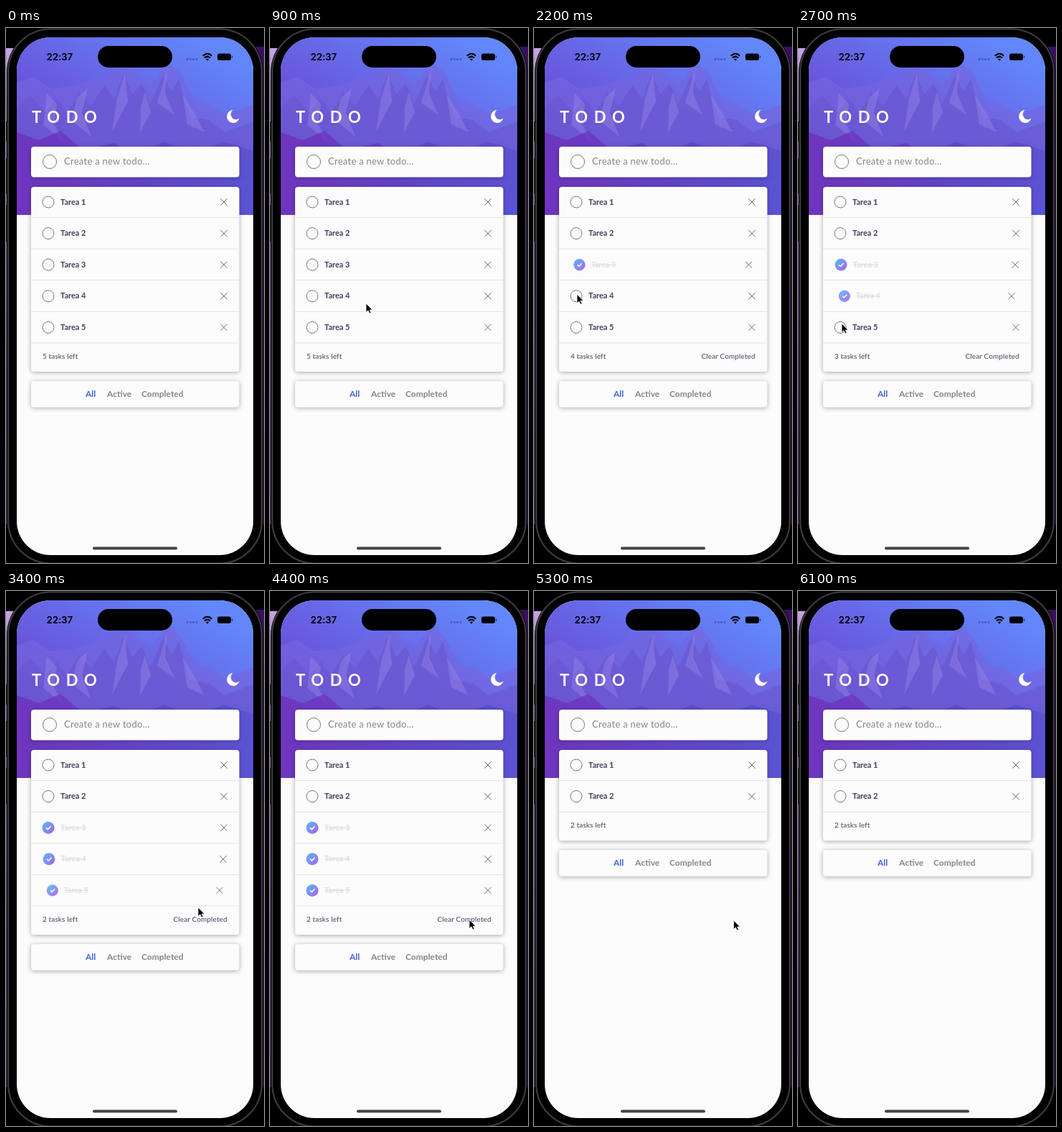
Write an HTML page that moves like this. It is 360 by 744 pixels and loops after 7.2 s.

```html
<!DOCTYPE html>
<html lang="es">
<head>
<meta charset="utf-8">
<title>Todo</title>
<style>
  html, body { margin: 0; width: 100%; height: 100%; overflow: hidden; background: #000; }
  svg { display: block; width: 360px; height: 744px; }
  text { font-family: Lato, sans-serif; }
  .card { fill: #fcfcfc; filter: drop-shadow(0 1px 3px rgba(30, 30, 60, .4)); }
  .line { stroke: #dfdfea; }
  .ring { fill: none; stroke: #77777d; }
  .cross { stroke: #66666c; fill: none; }
  .task { font-size: 11px; font-weight: 700; fill: #443f5c; }
  .done .task { fill: #dedee3; text-decoration: line-through; }
  .small { font-size: 10px; letter-spacing: .12px; fill: #45415a; }
  .filter { font-size: 12px; font-weight: 700; fill: #85858f; }
  .check, .done .ring { display: none; }
  .done .check { display: inline; }
</style>
</head>
<body>
<svg viewBox="0 0 360 744">
  <defs>
    <clipPath id="screen"><rect x="15" y="13" width="330" height="720" rx="47"/></clipPath>
    <linearGradient id="sky" x1="0" y1="1" x2=".75" y2="0">
      <stop offset="0" stop-color="#7029b7"/>
      <stop offset=".45" stop-color="#6a51d9"/>
      <stop offset="1" stop-color="#6287fa"/>
    </linearGradient>
    <linearGradient id="shade" x1="0" y1="0" x2="1" y2="0">
      <stop offset="0" stop-color="#7029b8"/>
      <stop offset="1" stop-color="#5550d2"/>
    </linearGradient>
    <linearGradient id="checkFill" x1="0" y1="0" x2="1" y2="1">
      <stop offset="0" stop-color="#55bcfb"/>
      <stop offset="1" stop-color="#aa60f1"/>
    </linearGradient>
    <linearGradient id="leftEdge" x1="0" y1="0" x2="0" y2="1">
      <stop offset="0" stop-color="#c8a2e6"/>
      <stop offset=".2" stop-color="#8a55b5"/>
      <stop offset="1" stop-color="#51306f"/>
    </linearGradient>
  </defs>

  <!-- phone body -->
  <rect width="360" height="744"/>
  <rect y="28" width="30" height="662" fill="url(#leftEdge)"/>
  <rect x="330" y="26" width="30" height="664" fill="#38105f"/>
  <rect x="1" y="0" width="358" height="746" rx="61" fill="#080808"/>
  <rect x="3.2" y="1.5" width="353.6" height="743" rx="59" fill="#000" stroke="#3d3d3f" stroke-width="2"/>
  <path d="M.5 130v28M.5 181v50M.5 246v51" stroke="#19191b" stroke-width="2"/>

  <g clip-path="url(#screen)">
    <rect x="15" y="13" width="330" height="720" fill="#fcfcfc"/>
    <rect x="15" y="13" width="330" height="247" fill="url(#sky)"/>
    <path d="M15 76L38 68 62 84 94 81 121 72 146 62 166 55 184 65 202 80 218 56 232 51 246 67 263 101 286 107 306 121 345 106V260H15Z" fill="#7666df" opacity=".65"/>
    <path d="M15 112L34 94 54 117 72 98 85 119 102 90 119 108 137 80 151 98 164 64 176 92 190 77 201 106 219 66 231 88 241 71 257 124 283 128 304 145 345 130V260H15Z" fill="#6654cd" opacity=".55"/>
    <path d="M57 91l14 15-4 28 15 25-30-24zM114 84l-8 34 13 33-27-22 7-32zM166 62l4 40-22 42 7-46zM225 57l-3 35 13 29-24-17zM246 91l20 33 11 21-24-11zM194 89l8 28-15 29 1-36z" fill="#9b87e7" opacity=".4"/>
    <path d="M15 145L46 156 76 143 108 170 150 160 183 175 221 158 263 176 303 158 345 171V260H15Z" fill="url(#shade)" opacity=".72"/>

    <!-- status bar -->
    <rect x="128" y="25" width="104" height="30" rx="15"/>
    <text x="56.5" y="45" style="font:600 13.5px Inter,sans-serif;letter-spacing:-.2px">22:37</text>
    <path d="M253 43.5h15" stroke="#2b3585" stroke-width="2.6" stroke-linecap="round" stroke-dasharray="0 4.3" opacity=".7"/>
    <g fill="none" stroke="#000" stroke-width="2">
      <path d="M274.7 38.7Q281 32.8 287.3 38.7M277 41.4Q281 37.8 285 41.4"/>
    </g>
    <path d="M278.9 43.4Q281 41.6 283.1 43.4L281 45.7Z"/>
    <rect x="295" y="35.5" width="19" height="9.5" rx="3"/>
    <path d="M315.6 38.5v3.5" stroke="#29306f" stroke-width="1.3"/>

    <text x="36" y="131.5" fill="#fff" style="font-size:22px;font-weight:700;letter-spacing:8.6px">TODO</text>
    <path d="M316.5 114A9 9 0 1 0 325.7 125.6A7.2 7.2 0 0 1 316.5 114Z" fill="#fff"/>

    <rect class="card" x="35" y="165" width="290.5" height="42.5" rx="4"/>
    <circle class="ring" cx="61" cy="186" r="9.5"/>
    <text x="81" y="189.8" fill="#85858d" style="font-size:13px;letter-spacing:.28px">Create a new todo...</text>

    <rect id="list" class="card" x="35" y="221" width="290.5" height="257" rx="4"/>
    <g id="lines"></g>
    <g id="rows"></g>
    <g id="lower">
      <text id="count" class="small" x="51" y="460"></text>
      <text id="clear" class="small" x="233.5" y="460">Clear Completed</text>
      <rect class="card" x="35" y="491" width="290.5" height="36.5" rx="4"/>
      <text class="filter" x="111" y="513" style="fill:#3d61dc">All</text>
      <text class="filter" x="141" y="513">Active</text>
      <text class="filter" x="189" y="513">Completed</text>
    </g>
    <rect x="121" y="721.5" width="118" height="4" rx="2" fill="#444446"/>
  </g>
  <path id="cursor" d="M0 0V12.4L2.9 9.8 5 14 7.1 13 5.1 9H9Z" stroke="#fff" stroke-width=".8"/>
</svg>
<script>
  const LOOP = 7200, STEP = 100, ROW = 43.6;
  const CLEAR = 4800, COLLAPSE = 5200, CURSOR_OUT = 6000;
  const checkedAt = [Infinity, Infinity, 1600, 2300, 3000];
  const $ = id => document.getElementById(id);

  // Linear interpolation through [time, value...] stops.
  function track(stops, t) {
    if (t <= stops[0][0]) return stops[0].slice(1);
    for (let i = 1; i < stops.length; i++) {
      const [a, ...from] = stops[i - 1], [b, ...to] = stops[i];
      if (t < b) return from.map((v, k) => v + (to[k] - v) * (t - a) / (b - a));
    }
    return stops[stops.length - 1].slice(1);
  }

  const scaleStops = [[0, .915], [100, .926], [400, .952], [1100, .992], [1400, 1]];
  const fadeStops = [[0, .5], [100, .68], [500, 1]];
  const exitStops = [[0, -1, 1], [100, -39, .78], [200, -72, .42], [300, -93, .12], [400, -100, 0]];
  const clearStops = [[1600, 0], [1700, .28], [1800, .65], [2000, 1],
    [CLEAR, 1], [4900, .78], [5000, .4], [5200, 0]];
  const cursorStops = [[200, 366, 656], [300, 352, 643], [500, 264, 540], [700, 165, 434],
    [900, 134, 383], [1200, 64, 329], [1600, 63, 331], [1700, 66, 345], [2000, 60, 369],
    [2300, 60, 371], [2500, 61, 385], [2700, 61, 411], [3000, 61, 412], [3200, 155, 424],
    [3400, 268, 440], [3700, 277, 454], [4400, 278, 457], [4900, 278.5, 458]];

  const rows = checkedAt.map((_, i) => {
    const y = 242 + i * ROW;
    $('lines').insertAdjacentHTML('beforeend',
      `<path class="line" d="M35 ${263.6 + i * ROW}h290.5"/>`);
    $('rows').insertAdjacentHTML('beforeend', `<g>
      <circle class="ring" cx="59" cy="${y}" r="8"/>
      <g class="check">
        <circle cx="59" cy="${y}" r="8.5" fill="url(#checkFill)"/>
        <path d="M56 ${y}l2.3 2.3 4.2-4.4" fill="none" stroke="#fff" stroke-width="1.6"/>
      </g>
      <text class="task" x="76" y="${y + 3.6}">Tarea ${i + 1}</text>
      <path class="cross" d="M299.3 ${y - 4.7}l9.4 9.4m0-9.4l-9.4 9.4"/>
    </g>`);
    return { node: $('rows').lastElementChild, line: $('lines').lastElementChild, y };
  });

  function render(t) {
    const collapsed = t >= COLLAPSE;
    let left = rows.length;
    rows.forEach(({ node, line, y }, i) => {
      const age = t - checkedAt[i], done = age >= 0;
      const gone = collapsed && i > 1;
      if (done) left--;
      const [scale] = done ? track(scaleStops, age) : [1];
      const [dy, opacity] = done && t >= CLEAR ? track(exitStops, t - CLEAR) : [0, 1];
      node.classList.toggle('done', done);
      node.style.display = line.style.display = gone ? 'none' : '';
      node.setAttribute('opacity', opacity);
      node.setAttribute('transform',
        `translate(180 ${y + dy}) scale(${scale}) translate(-180 ${-y})`);
      node.querySelector('.check').setAttribute('opacity', done ? track(fadeStops, age)[0] : 0);
    });

    const lift = collapsed ? 3 * ROW : 0;
    $('list').setAttribute('height', 257 - lift);
    $('lower').setAttribute('transform', `translate(0 ${-lift})`);
    $('count').textContent = `${left} tasks left`;
    $('clear').setAttribute('opacity', track(clearStops, t)[0]);
    $('cursor').setAttribute('transform', `translate(${track(cursorStops, t)})`);
    $('cursor').style.display = t < 200 || t >= CURSOR_OUT ? 'none' : '';
  }

  function frame() {
    const t = performance.now() % LOOP;
    render(Math.floor(t / STEP) * STEP);
    requestAnimationFrame(frame);
  }
  frame();
</script>
</body>
</html>
```
